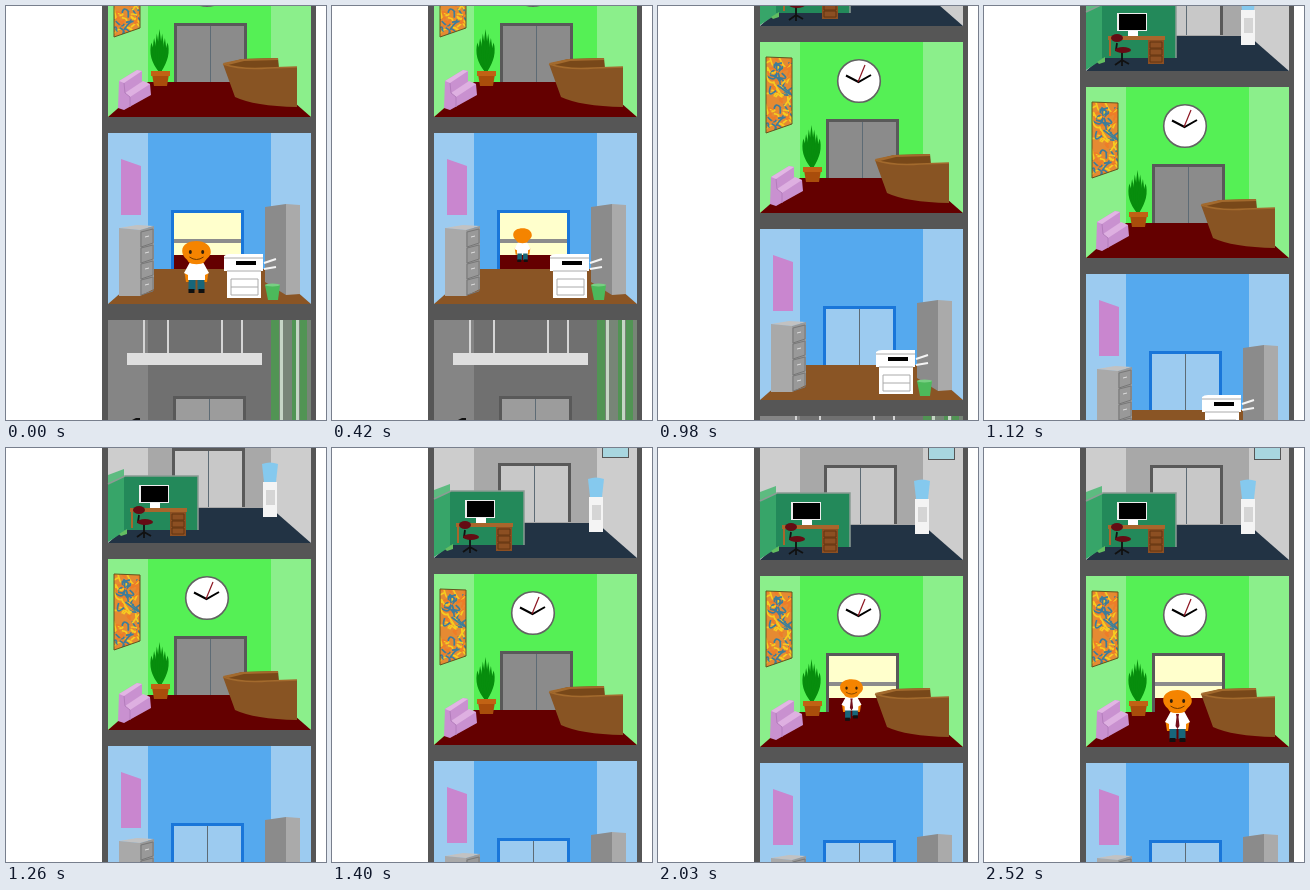
These frames come from a looping animation (320x414 px, 2590 ms). An HTML page with a canvas:

```html
<!DOCTYPE html>
<html lang="en">
<head>
<meta charset="utf-8">
<title>Office elevator</title>
<style>
html, body { margin: 0; width: 100%; height: 100%; overflow: hidden; background: #fff; }
canvas { display: block; width: 320px; height: 414px; }
</style>
</head>
<body>
<canvas id="stage" width="320" height="414"></canvas>
<script>
const ctx = document.getElementById('stage').getContext('2d');
const STEP = 70, STEPS = 37, FLOOR = 188;
const clamp = v => Math.max(0, Math.min(1, v));
const ramp = (n, from, to) => clamp((n - from) / (to - from));
const mix = (a, b, p) => a + (b - a) * p;

function box(x, y, x2, y2, fill) {
  ctx.fillStyle = fill;
  ctx.fillRect(x, y, x2 - x, y2 - y);
}
function shape(d, fill, stroke, width = 1) {
  const path = new Path2D(d);
  if (fill) { ctx.fillStyle = fill; ctx.fill(path); }
  if (stroke) { ctx.strokeStyle = stroke; ctx.lineWidth = width; ctx.stroke(path); }
}
function oval(x, y, rx, ry, fill, stroke, width = 1) {
  ctx.beginPath();
  ctx.ellipse(x, y, rx, ry, 0, 0, 7);
  if (fill) { ctx.fillStyle = fill; ctx.fill(); }
  if (stroke) { ctx.strokeStyle = stroke; ctx.lineWidth = width; ctx.stroke(); }
}
function room(top, back, side, floor) {
  box(102, top, 305, top + 171, side);
  box(142, top, 265, top + 171, back);
  shape(`M142 ${top + 136}H265L305 ${top + 171}H102Z`, floor);
}

function elevator(x, y, frame, panel, open = 0, rider) {
  const l = x + 3, r = x + 70, top = y + 3, bottom = y + 59;
  const mid = (l + r) / 2, slide = open * (r - l) / 2;
  box(x, y, x + 73, bottom, frame);
  if (open) {
    box(l, top, r, bottom, '#ffffcc');
    box(l, y + 29, r, y + 33, '#8c8c8c');
    box(l, y + 45, r, bottom, '#640000');
  }
  if (rider) person(rider);
  box(l, top, mid - slide, bottom, panel);
  box(mid + slide, top, r, bottom, panel);
  if (!open) box(mid - .5, top, mid + .5, bottom, '#5d6b75');
}

function person({ x, y, scale, back, tie, stride }) {
  ctx.save();
  ctx.translate(x, y);
  ctx.scale(scale, scale);
  for (const side of [-1, 1]) {
    const lift = Math.max(0, stride * side) * 3;
    box(side * 4.5 - 3.5, -15, side * 4.5 + 3.5, -3 - lift, '#17667a');
    box(side * 5 - 3, -4 - lift, side * 5 + 3, -lift, '#111');
    shape(`M${side * 8} -24L${side * 12} -21L${side * 10.5} -11H${side * 8}Z`, '#f58400');
  }
  shape('M-7 -30H7L12.5 -20L8.5 -18V-13H-8.5V-18L-12.5 -20Z', '#fff');
  if (tie) shape('M-1.5 -28H1.5L1 -25L2 -16L0 -13L-2 -16L-1 -25Z', '#74101c');
  shape('M-14.3 -42C-14.3 -49 -7 -52 0 -52C8 -52 14.3 -48 14.3 -41C14.3 -36 9 -34 8 -31C5 -28 -5 -28 -8 -31C-9 -34 -14.3 -36 -14.3 -42Z', '#f58400');
  if (!back) {
    oval(-6.2, -41, 1.5, 2, '#30200c');
    oval(6.2, -41, 1.5, 2, '#30200c');
    shape('M-7 -36Q0 -31 7 -36', null, '#6e3a00');
  }
  ctx.restore();
}

function office() {
  room(-59, '#a8a8a8', '#cdcdcd', '#223344');
  elevator(166, 17, '#595959', '#c8c8c8');
  box(270, -20, 297, 12, '#555');
  box(271, -20, 296, 11, '#a8d6df');
  // cubicle
  shape('M102 44L118 38V46L102 53Z', '#5dbb80');
  shape('M102 53L119 45V100L102 111Z', '#37a569');
  box(118, 45, 192, 99, '#23895a');
  shape('M102 53L119 45H192V99', null, '#8b9c94', 1.5);
  shape('M113 103L121 98V103L115 105Z', '#63bd61');
  // desk, screen and chair
  box(144, 71, 154, 77, '#fff');
  box(133, 54, 163, 72, '#eee');
  box(135, 55, 162, 71, '#000');
  box(124, 77, 181, 81, '#a8662c');
  box(125, 81, 127, 97, '#a8662c');
  box(164, 81, 180, 105, '#8c4f22');
  for (const y of [83, 90, 97]) shape(`M166 ${y}H178V${y + 6}H166Z`, null, '#633411');
  shape('M138 93V102M131 106L138 101L145 105M138 101V107M133 84L132 91H140', null, '#111', 1.8);
  oval(133, 79, 6, 4, '#640c14');
  oval(139, 91, 8, 3, '#640c14');
  // water cooler
  shape('M256 33Q264 30 272 33L270 51H258Z', '#85c9ee');
  box(257, 51, 271, 86, '#f4f4f4');
  box(260, 59, 269, 74, '#d5d5d5');
}

function painting() {
  const frame = new Path2D('M108 143L134 144V210L108 219Z');
  let seed = 7;
  const rand = () => (seed = seed * 16807 % 2147483647) / 2147483647;
  const px = () => 106 + rand() * 30, py = () => 141 + rand() * 78;
  ctx.save();
  ctx.clip(frame);
  box(108, 143, 134, 219, '#e58a32');
  for (let i = 0; i < 90; i++) {
    const x = px(), y = py(), turn = () => rand() * 24 - 12;
    shape(`M${x} ${y}q${turn()} ${turn()} ${turn()} ${turn()}`, null,
      ['#3d7d9b', '#f7cc20', '#ee7d28'][i % 3], 1.7);
  }
  ctx.restore();
  ctx.strokeStyle = '#62551f';
  ctx.lineWidth = 1;
  ctx.stroke(frame);
}

function lobby(open, rider) {
  room(128, '#55f055', '#8bef8b', '#640000');
  painting();
  oval(201, 167, 21.3, 21.3, '#fff', '#626262', 1.6);
  shape('M188 161.5L200.5 168L213 161', null, '#000', 2);
  shape('M200 168L207 151', null, '#8c1420', 1.2);
  elevator(168, 205, '#595959', '#8b8b8b', open, open && rider);
  // plant
  for (let i = -3; i <= 3; i++) {
    const x = 153.5 + i * 2.7, y = 211 + Math.abs(i) * 4.5;
    shape(`M153 254Q${x - 4} 240 ${x} ${y}Q${x + 4} 238 155 254Z`, '#078d0d');
  }
  shape('M146 256H163L161 268H148Z', '#a94d0b');
  box(145, 253, 164, 258, '#c16214');
  // sofa
  shape('M113 263L131 252L136 253V264L144 266L145 277L118 292L112 290Z', '#c991d0');
  shape('M113 263L131 252L136 253L118 265Z', '#e2b6e4');
  shape('M119 275L137 263L144 266L124 279Z', '#deb0e1');
  shape('M118 265L119 275L124 279V289', null, '#b37dbc');
  // reception desk
  shape('M217 246L236 241L272 240L273 250L240 254Z', '#784819');
  shape('M217 245L236 241L272 240V242L238 243L222 247Z', '#a36a2d');
  shape('M217 246Q235 252 262 250L291 249V289Q248 288 229 279Z', '#885423');
  shape('M217 246Q235 252 262 250L291 249', null, '#a36a2d', 1.4);
}

function copyRoom(open, rider) {
  room(127, '#55a9ee', '#9ccbf0', '#8a5525');
  shape('M115 153L135 160V209L115 209Z', '#c986cf');
  elevator(165, 204, '#1976d9', '#9ccbf0', open, open && rider);
  // drawers
  shape('M113 222L131 219L148 220L134 224Z', '#c2c2c2');
  shape('M113 222L134 224V290H113Z', '#a9a9a9');
  shape('M134 224L148 220V283L134 290Z', '#999');
  for (let i = 0; i < 4; i++) {
    const y = 226 + i * 16;
    shape(`M135 ${y}L147 ${y - 3}V${y + 11}L135 ${y + 15}Z`, null, '#777');
    shape(`M139 ${y + 5}L143 ${y + 4}`, null, '#ddd');
  }
  // cupboard
  shape('M259 201L280 198V289L259 276Z', '#8b8b8b');
  shape('M280 198L294 199V288L280 289Z', '#aaa');
  // copier
  shape('M258 257L270 253M258 263L270 261', null, '#f5f5f5', 2);
  box(221, 264, 255, 292, '#fff');
  shape('M225 273H252V289H225ZM225 281H252', null, '#aaa');
  shape('M218 250Q220 248 224 248H257V265H218Z', '#fff');
  shape('M218 252H257M221 265H255', null, '#aaa');
  box(230, 255, 250, 259, '#000');
  // bin
  shape('M259 279H274L272 294H262Z', '#4cb95b');
  oval(266.5, 279, 7.5, 1.5, '#78cf83');
}

function basement() {
  room(314, '#707070', '#858585', '#555');
  for (const x of [138, 162, 216, 236]) box(x - 1, 314, x + 1, 348, '#d5d5d5');
  box(121, 347, 256, 359, '#dedede');
  elevator(167, 390, '#595959', '#9c9c9c');
  box(265, 314, 305, 414, '#778577');
  for (const [x, w] of [[265, 8], [286, 4], [294, 7]]) box(x, 314, x + w, 414, '#519454');
  for (const x of [274, 290]) box(x, 314, x + 3, 414, '#c5d6c5');
  shape('M126 414L130 412H134V414Z', '#111');
}

function draw(now) {
  const n = Math.floor(now / STEP) % STEPS;
  const rise = n < 14 ? 96 * Math.pow(ramp(n, 9, 14), 1.92)
                      : FLOOR - 92 * Math.pow(1 - ramp(n, 14, 21), 2);
  const enter = ramp(n, 0, 6), leave = ramp(n, 26, 33);
  const swing = p => p > 0 && p < 1 ? (n % 2 ? 1 : -1) : 0;
  const guest = { x: 190.5, y: mix(287, 256, enter), scale: mix(1, .65, enter),
                  back: n > 0, stride: swing(enter) };
  const worker = { x: 193.5, y: mix(257, 294, leave), scale: mix(.65, 1, leave),
                   tie: true, stride: swing(leave) };
  box(0, 0, 320, 414, '#fff');
  box(96, 0, 310, 414, '#565656');
  ctx.save();
  ctx.translate(0, Math.round(rise));
  copyRoom(1 - ramp(n, 6, 9), guest);
  basement();
  ctx.translate(0, -FLOOR);
  office();
  lobby(ramp(n, 22, 26), worker);
  ctx.restore();
  requestAnimationFrame(draw);
}
requestAnimationFrame(draw);
</script>
</body>
</html>
```
